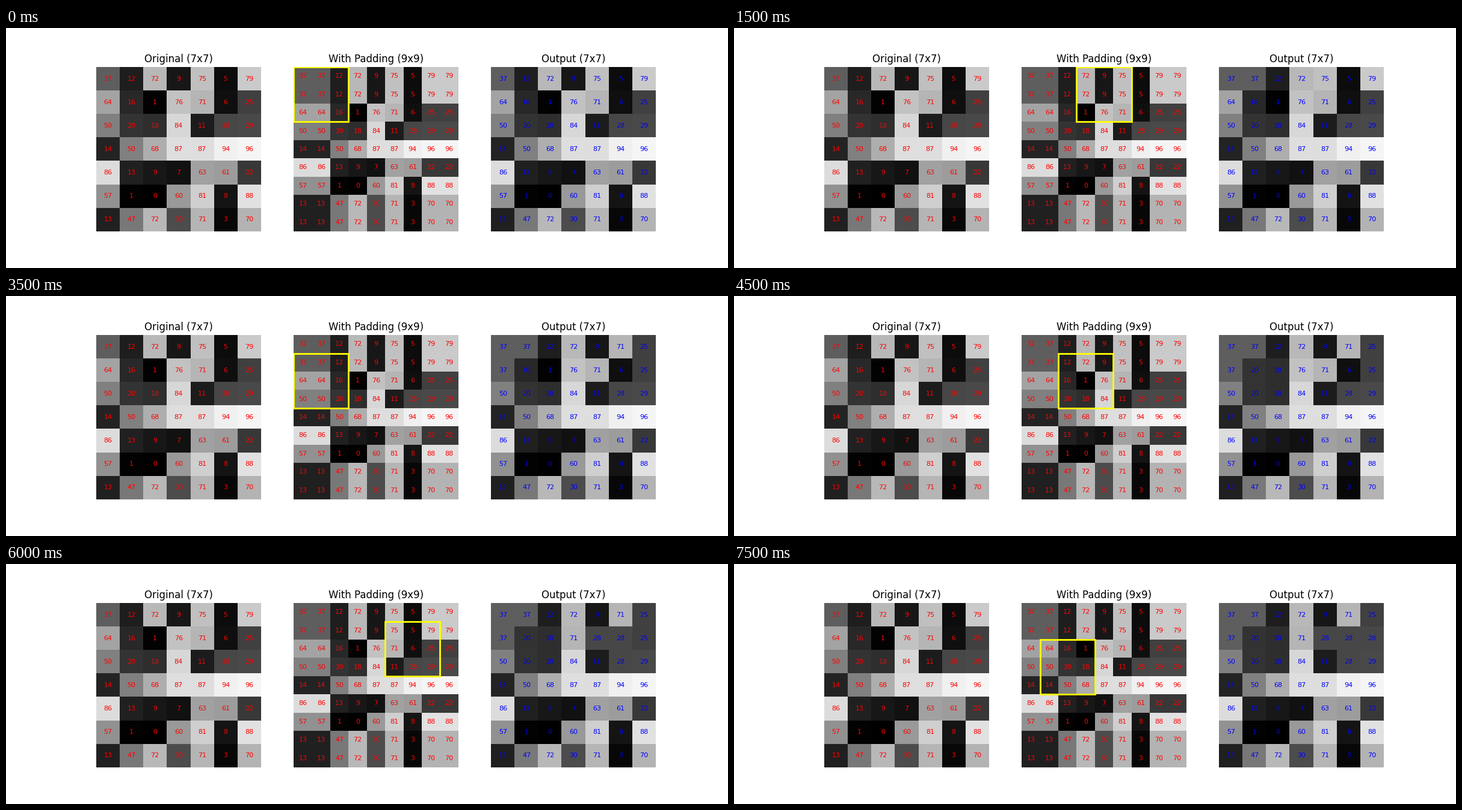
A matplotlib script for the animation above (8000 ms loop, 1200x400 px).

```python
import matplotlib.pyplot as plt
import numpy as np
from matplotlib.animation import FuncAnimation
from matplotlib.patches import Rectangle

FRAMES = 16
INTERVAL = 500
SIZE = 7
KERNEL = 3

image = np.random.RandomState(1).randint(0, 100, (SIZE, SIZE))
padded = np.pad(image, KERNEL // 2, mode="edge")


def median_filtered(steps):
    """Return the image with its first `steps` cells replaced by local medians."""
    result = image.copy()
    for step in range(steps):
        row, col = divmod(step, SIZE)
        window = padded[row:row + KERNEL, col:col + KERNEL]
        result[row, col] = np.median(window)
    return result


def draw_grid(ax, values, name, color):
    """Show values as gray cells with a number in each one."""
    picture = ax.imshow(values, cmap="gray", vmin=0, vmax=100)
    labels = [
        ax.text(col, row, str(value), color=color, fontsize=8,
                ha="center", va="center")
        for (row, col), value in np.ndenumerate(values)
    ]
    rows, cols = values.shape
    ax.set_title(f"{name} ({rows}x{cols})")
    ax.axis("off")
    return picture, labels


plt.rcParams["font.family"] = "DejaVu Sans"
fig, (ax_image, ax_padded, ax_output) = plt.subplots(1, 3, figsize=(12, 4), dpi=100)

draw_grid(ax_image, image, "Original", "red")
draw_grid(ax_padded, padded, "With Padding", "red")
picture, labels = draw_grid(ax_output, image, "Output", "blue")

marker = Rectangle((-0.5, -0.5), KERNEL, KERNEL, fill=False,
                   edgecolor="yellow", linewidth=2)
ax_padded.add_patch(marker)


def update(frame):
    row, col = divmod(frame, SIZE)
    marker.set_xy((col - 0.5, row - 0.5))
    output = median_filtered(frame + 1)
    picture.set_data(output)
    for label, value in zip(labels, output.flat):
        label.set_text(str(value))
    return [marker, picture, *labels]


anim = FuncAnimation(fig, update, frames=FRAMES, interval=INTERVAL,
                     repeat=True, repeat_delay=0)
plt.show()
```
